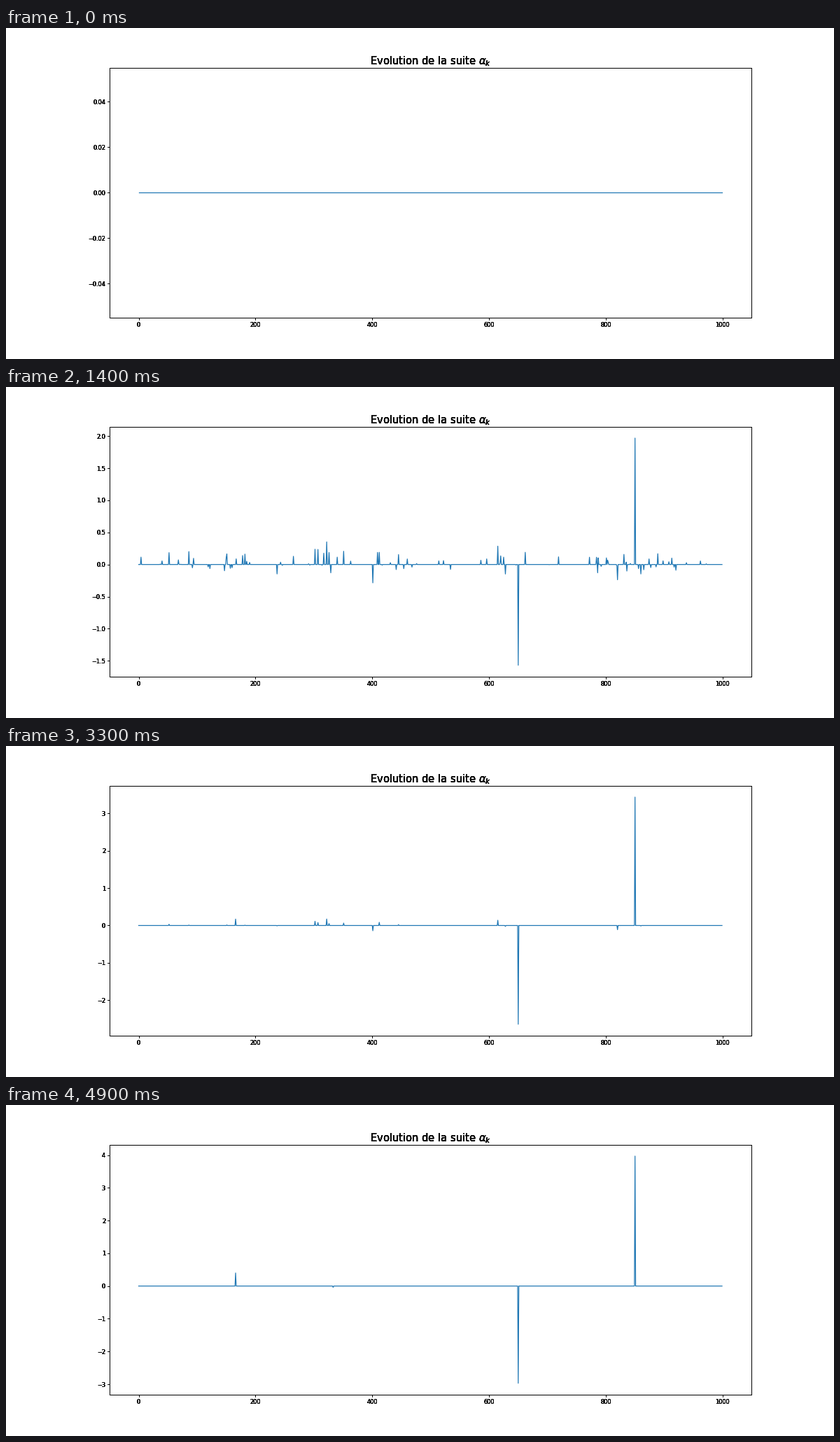
These frames come from a looping animation (1183x473 px, 8100 ms). A matplotlib script:

```python
import numpy as np
import matplotlib.pyplot as plt
from matplotlib.animation import FuncAnimation

DPI = 59.15
WIDTH, HEIGHT = 1183, 473
N = 1000
FRAMES, STEP_MS, LAST = 81, 100, 49
PASSES = 5

# the two large coefficients grow through these points
KEYS = [0, 2, 6, 14, 21, 28, 37, 45]
HIGH = [0, .52, 1.18, 1.97, 2.56, 3.10, 3.70, 3.97]
LOW = [0, .41, .92, 1.57, 2.04, 2.43, 2.81, 2.97]

# tallest of the spikes that die out; the others are random
TALL = {86: .22, 302: .25, 307: .25, 322: .37, 351: .22, 401: -.30,
        409: .21, 615: .30, 662: .21, 820: -.25}

rng = np.random.default_rng(4)
spikes = np.zeros(N)
spots = rng.choice(N, 150, replace=False)
spikes[spots] = np.clip(rng.normal(.01, .095, spots.size), -.16, .2)
spikes[list(TALL)] = list(TALL.values())
# taller spikes survive longer
ends = np.clip(4 + 150 * np.abs(spikes) + rng.uniform(-5, 8, N), 7, 43)


def ramp(k, start, stop):
    return np.clip((k - start) / (stop - start), 0, 1)


def alpha(k):
    """Coefficients at iteration k: the noise fades, the support remains."""
    y = spikes * ramp(k, 0, 6) ** .7 * (1 - ramp(k, 6, ends) ** 2)
    y[850] = np.interp(k, KEYS, HIGH)
    y[650] = -np.interp(k, KEYS, LOW)
    y[166] = .4 * ramp(k, 24, 45)
    y[333] = -.04 * ramp(k, 40, 45)
    return y


def draw_solid(artist):
    """Paint an artist several times over, so its soft edges turn opaque."""
    draw = artist.draw

    def repeat(renderer):
        for _ in range(PASSES):
            draw(renderer)

    artist.draw = repeat


fig, ax = plt.subplots(figsize=(WIDTH / DPI, HEIGHT / DPI), dpi=DPI)
fig.subplots_adjust(left=.125, right=.9, bottom=.125, top=.88)
ax.set_title(r"Evolution de la suite $\alpha_k$", fontsize=18)
line, = ax.plot(np.arange(N), np.zeros(N), color="C0", lw=1.5)
for part in (ax.title, ax.xaxis, ax.yaxis, *ax.spines.values()):
    draw_solid(part)


def update(frame):
    line.set_ydata(alpha(min(frame, LAST)))
    ax.relim()
    ax.autoscale_view()
    return line,


anim = FuncAnimation(fig, update, frames=FRAMES, interval=STEP_MS,
                     repeat=True, repeat_delay=0)
plt.show()
```
